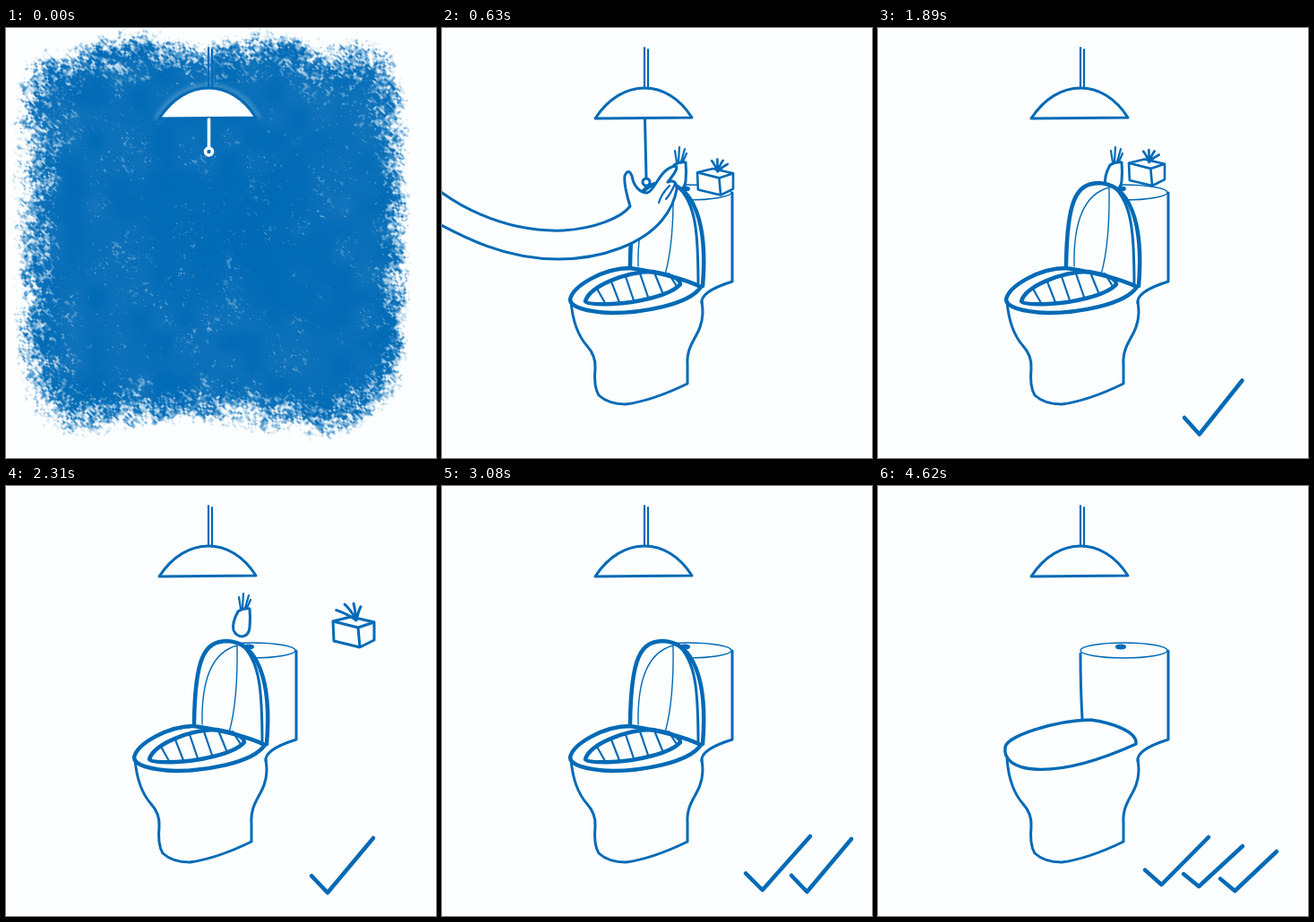
Animation, 480 px wide and 480 px high, one loop 5250 ms. Source, as an HTML page with a canvas:

```html
<!DOCTYPE html>
<html lang="en">
<head>
<meta charset="utf-8">
<title>Bathroom routine</title>
<style>
  html, body { margin: 0; width: 100%; height: 100%; overflow: hidden; background: #fcfeff; }
  canvas, svg { position: absolute; left: 0; top: 0; width: 100%; height: 100%; display: block; }
  path, circle, ellipse { fill: none; stroke: #006ab6; stroke-width: 3; stroke-linecap: round; stroke-linejoin: round; }
  .paper { fill: #fcfeff; }
  .thin { stroke-width: 1.4; }
  .mid { stroke-width: 2.2; }
  .bold { stroke-width: 4.5; }
  .halo { stroke: #9cc8e6; stroke-width: 5; opacity: .35; filter: blur(2px); }
  .dark .ink { stroke: #fcfeff; stroke-width: 3.6; }
  .dark #skin { fill: none; }
</style>
</head>
<body>
<canvas id="night" width="480" height="480"></canvas>
<svg id="stage" viewBox="0 0 480 480">
  <g id="room">
    <path d="M226 187Q226 225 228 260"/>
    <ellipse class="thin" cx="274.500" cy="183.500" rx="48.500" ry="8.500"/>
    <ellipse cx="271" cy="179.500" rx="4.500" ry="1.500"/>
    <g id="vase">
      <path class="paper" d="M259 140Q252 153 254 161Q257 168 264 168Q271 167 272 158Q273 147 272 137Q265 136 259 140Z"/>
      <path class="mid" d="M262 137L260 124M264 136L265 120M267 136L271 122M269 136L273 127"/>
    </g>
    <g id="cube">
      <path class="paper" d="M-23 -10L-3 -15L23 -9V11L7 19L-22 12ZL5 -3L23 -9M5 -3L7 19"/>
      <path id="leaves"/>
    </g>
    <path d="M144 305C146 330 154 346 162 355Q172 366 171 380Q169 400 175 410Q186 420 205 420Q235 416 274 397V377C272 350 290 345 291 318Q291 312 290 306"/>
    <path d="M324 184V283Q305 289 297 295Q289 301 290 307"/>
    <g id="seat">
      <path class="bold" d="M143 303C146 288 180 268 210 268Q262 276 289 289C275 310 220 318 190 318C160 317 143 311 143 303Z"/>
      <path class="bold" d="M160 305C165 288 205 272 235 272Q266 277 266 286C255 299 215 307 190 308Q162 309 160 305Z"/>
      <path id="hatch" class="mid"/>
    </g>
    <g id="lid">
      <path id="cover" class="paper"/>
      <g id="lining">
        <path class="thin" d="M219 266C218 220 228 186 258 178Q259 240 249 275"/>
        <path d="M262 176C284 195 286 230 286 288"/>
      </g>
    </g>
    <g id="ticks"></g>
  </g>
  <g id="glow">
    <path class="halo" d="M228 22V66M168 100Q191 64 226 64T282 99"/>
  </g>
  <path class="mid" d="M226 22V67M230 24V67"/>
  <path class="paper" d="M171 101C186 78 206 67 226 67S265 78 279 100Z"/>
  <g id="arm">
    <path id="skin" class="paper ink" d="M-45 140C5 205 80 228 135 226C170 224 200 212 210 199C206 186 203 172 204 165Q208 156 212 165C214 178 222 184 229 184C238 182 243 156 261 154Q265 156 252 172Q262 168 262 180Q259 198 246 214C225 240 180 258 130 258C75 258 30 240 -45 195"/>
    <path class="mid" d="M254 176Q245 185 242 195M260 174Q256 184 250 191"/>
  </g>
  <path id="cord" class="ink"/>
  <circle id="knob" class="ink" r="4"/>
</svg>
<script>
const LOOP = 5250, STEP = 70, TAU = 2 * Math.PI;
const $ = id => document.getElementById(id);
const clamp = v => Math.max(0, Math.min(1, v));
const mix = (a, b, p) => a + (b - a) * p;
const blend = (a, b, p) => a.map((v, i) => mix(v, b[i], p));
const ease = p => p * p * (3 - 2 * p);
const show = (el, on) => { el.style.display = on ? '' : 'none'; };
const move = (el, x, y, more = '') => el.setAttribute('transform', `translate(${x} ${y})${more}`);

// Chalky blue patch that stands for the dark room
function paintNight() {
  const hash = (x, y) => {
    let h = Math.imul(x, 374761393) + Math.imul(y, 668265263);
    h = Math.imul(h ^ (h >>> 13), 1274126177);
    return ((h ^ (h >>> 16)) >>> 0) / 4294967296;
  };
  const noise = (x, y) => {
    const i = Math.floor(x), j = Math.floor(y), u = ease(x - i), v = ease(y - j);
    return mix(mix(hash(i, j), hash(i + 1, j), u), mix(hash(i, j + 1), hash(i + 1, j + 1), u), v);
  };
  const ctx = $('night').getContext('2d');
  const img = ctx.createImageData(480, 480);
  for (let y = 0; y < 480; y++) for (let x = 0; x < 480; x++) {
    const dx = (x - 229) / 223;
    const half = 226 + (y > 228 ? 8 * Math.cos((x - 60) / 46) : 7 * Math.cos((x - 150) / 22));
    const dy = (y - 228) / half;
    const depth = dx > Math.abs(dy) ? 48 : 64;
    const d = (1 - Math.pow(dx ** 6 + dy ** 6, 1 / 6)) * 225 / depth;
    const u = x + y, v = x - y;
    const fine = noise(u / 4, v / 3), wide = noise(x / 25 + 40, y / 25);
    const n = clamp((fine * .45 + noise(u / 11 + 90, v / 8) * .3 + wide * .25 - .2) / .6);
    let a = ease(clamp((Math.sqrt(clamp(d)) * 1.55 - n * .95) / .85));
    a *= 1 - .07 * wide * clamp(1.8 - d / 2);
    if (fine > .95 && wide > .6) a *= .7;
    img.data.set([0, 106, 182, a * 255], (y * 480 + x) * 4);
  }
  ctx.putImageData(img, 0, 0);
}

// Lid poses: start, then three cubic segments (left side, front, hinge)
const lidUp = [210,265, 211,190, 222,174, 246,173, 280,174, 297,215, 291,288, 291,288, 210,265, 210,265];
const lidLow = [223,260, 180,268, 140,282, 140,289, 145,301, 240,300, 288,288, 290,276, 260,268, 223,260];
const lidShut = [237,261, 195,262, 142,280, 142,292, 138,318, 190,332, 288,288, 290,274, 260,264, 237,261];

let bars = '';
for (let i = 0; i < 6; i++) {
  const x = 173 + 16 * i;
  bars += `M${x} ${273 + 18 * ((i - 4) / 4) ** 2}L${x + 9} ${307 - .75 * i * i}`;
}
$('hatch').setAttribute('d', bars);

const marks = [0, 1, 2].map(() => {
  const el = document.createElementNS('http://www.w3.org/2000/svg', 'path');
  el.setAttribute('class', 'bold');
  el.setAttribute('pathLength', 1);
  return $('ticks').appendChild(el);
});

function tick(el, [x, y, w, h], grown) {
  show(el, grown > 0);
  el.setAttribute('d', `M${x} ${y + h * .69}L${x + w * .26} ${y + h}L${x + w} ${y}`);
  el.style.strokeDasharray = grown < 1 ? `${grown} 2` : 'none';
}

function drawArm(span) {
  const enter = span(70, 350), pull = span(490, 560), leave = ease(span(840, 1260));
  show($('arm'), enter > 0 && leave < 1);
  move($('arm'), -265 * (1 - enter) - 285 * leave, -34 * (1 - pull));
  const back = span(840, 980);
  const x = mix(226.5, 228, pull), y = mix(mix(138, 172, pull), 108, back);
  $('cord').setAttribute('d', `M226.5 102L${x} ${y - 5}`);
  move($('knob'), x, y);
  show($('cord'), back < 1);
  show($('knob'), back < 1);
}

function drawPlants(span) {
  const lift = span(1890, 1960), fly = span(2170, 2310), off = span(2380, 2660), gone = span(2730, 3080);
  const hop = lift * (1 - fly);
  move($('cube'), mix(305, 388, fly) - 10 * hop + 25 * off, mix(170, 161, fly) - 21 * hop + 10 * off,
    ` scale(${mix(.87, 1, fly)})`);
  $('cube').style.opacity = 1 - off;
  let fan = '';
  for (let i = 0; i < 4; i++) {
    const a = (-28 + 27 * i - 35 * fly) * TAU / 360, r = mix(16, 25 - 3 * i, fly);
    fan += `M3 -11Q${3 + r * .5 * Math.sin(a)} ${-11 - r * .7 * Math.cos(a)} ${3 + r * Math.sin(a)} ${-11 - r * Math.cos(a)}`;
  }
  $('leaves').setAttribute('d', fan);
  move($('vase'), -120 * off - 110 * gone, 13 * (1 - fly) + 12 * gone);
  $('vase').style.opacity = 1 - clamp(gone * 3 - 2);
}

function drawLid(span) {
  const fall = span(3710, 3920), shut = span(3990, 4060);
  const swing = 4 * fall * (1 - fall);
  const low = blend(lidUp, lidLow, fall).map((v, i) =>
    v - swing * Math.sin(Math.PI * clamp((i >> 1) / 6)) * (i % 2 ? 30 : 22));
  const p = blend(low, lidShut, shut);
  const end = fall > 0 ? p.length : 14;
  $('cover').setAttribute('d', `M${p.slice(0, 2)}C${p.slice(2, end)}`);
  $('cover').style.strokeWidth = mix(4.5, 3.4, shut);
  show($('lining'), fall === 0);
  show($('seat'), shut < 1);
  // The raised lid stands behind the seat, the falling one covers it
  if (fall > 0) $('seat').after($('lid'));
  else $('seat').before($('lid'));
}

function drawTicks(span) {
  const a = span(1890, 1960), b = span(2730, 3080), c = span(3710, 3920), d = span(4340, 4620);
  const path = (from, ...keys) => keys.reduce((box, [to, p]) => blend(box, to, p), from);
  tick(marks[0], path([343, 394, 60, 59], [[341, 393, 69, 61], a], [[339, 391, 72, 60], b],
    [[342, 402, 67, 45], c], [[298, 392, 71, 53], d]), span(980, 1260));
  tick(marks[1], path([390, 394, 67, 59], [[387, 404, 63, 45], c], [[341, 402, 66, 45], d]), b);
  tick(marks[2], [382, 408, 63, 44], d);
}

function draw(now) {
  const t = Math.floor((now % LOOP) / STEP) * STEP;
  // Progress of a stepped move whose last pose lands on b
  const span = (a, b) => clamp((t - a + STEP) / (b - a + STEP));
  const dark = t < 630;
  $('stage').classList.toggle('dark', dark);
  show($('night'), dark);
  show($('glow'), dark);
  show($('room'), !dark);
  $('arm').lastElementChild.style.stroke = dark ? '#fcfeff' : '';
  drawArm(span);
  drawPlants(span);
  drawLid(span);
  drawTicks(span);
}

paintNight();
const start = performance.now();
function loop() {
  draw(performance.now() - start);
  requestAnimationFrame(loop);
}
loop();
</script>
</body>
</html>
```
